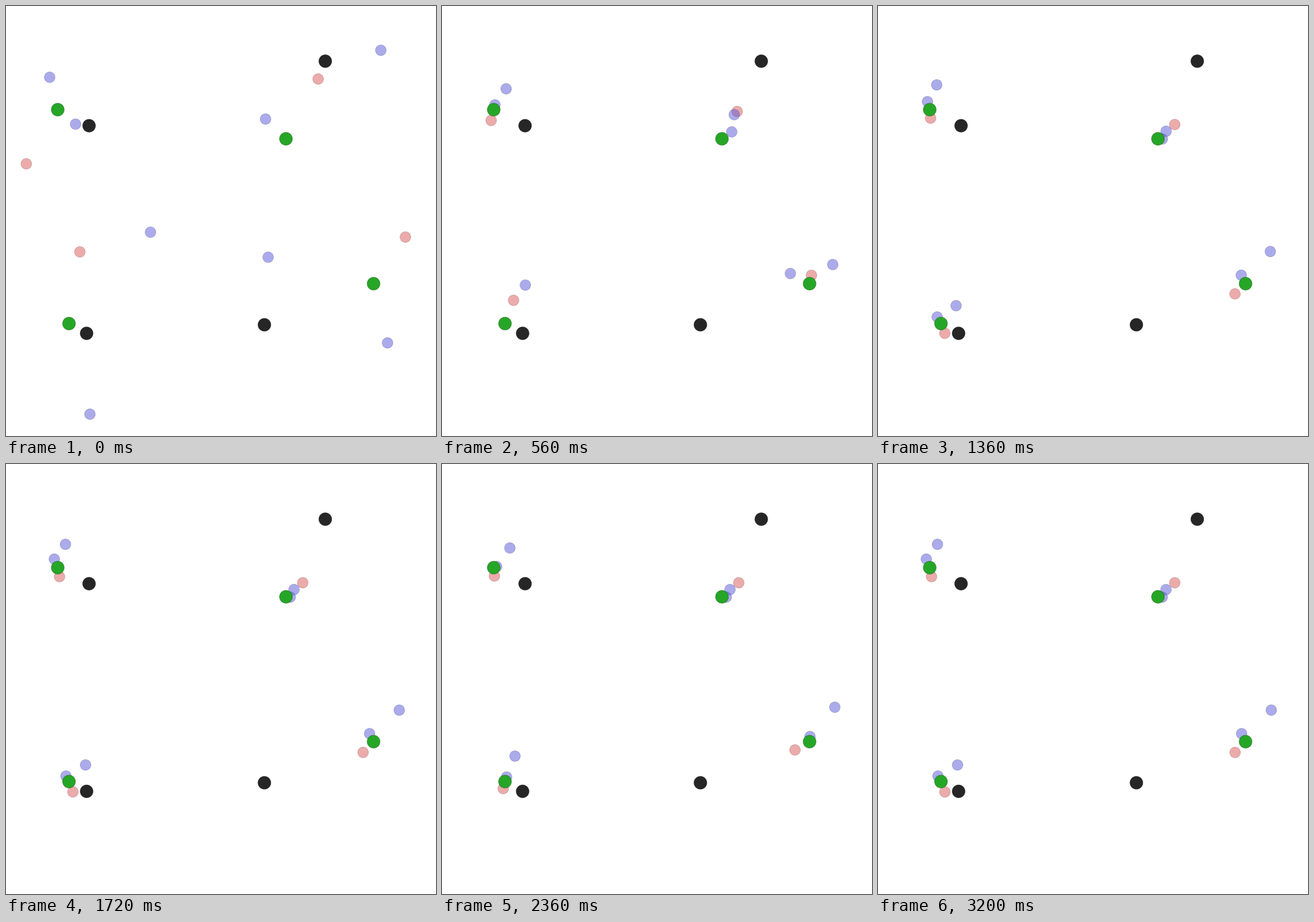
Animation, 748 px wide and 748 px high, one loop 3240 ms. Source, as a matplotlib script:

```python
import numpy as np
import matplotlib.pyplot as plt
from matplotlib.animation import FuncAnimation
from matplotlib.patches import Circle

SIZE, DPI = 748, 100
FRAMES, STEP_MS = 81, 40
PERIOD = 37 / 8        # frames per sway
ARRIVAL = 14           # end of the dash, start of the slow drift home
DASH, DRIFT = 0.6, 0.3

BLUE, RED = (0.35, 0.35, 0.85), (0.85, 0.35, 0.35)
GREEN, BLACK = (0.15, 0.65, 0.15), (0.15, 0.15, 0.15)


def approach(t, rate):
    """Critically damped step from 0 to 1."""
    return 1 - (1 + rate * t) * np.exp(-rate * t)


class Agent:
    """Dashes from start to near, drifts home and sways there diagonally."""
    color, slant, twist = BLUE, 0.95, 0.08
    layer = 2

    def __init__(self, start, home, near=None, sway=0, lag=0):
        self.start, self.home = np.array(start), np.array(home)
        self.near = self.home if near is None else np.array(near)
        self.sway = sway * np.array([1, self.slant])
        self.lag = lag + np.array([0, self.twist])
        self.patch = disc(start, 9.35, self.color, 0.5, self.layer)

    def at(self, frame):
        if frame <= ARRIVAL:
            done = approach(frame, DASH) / approach(ARRIVAL, DASH)
            return self.start + (self.near - self.start) * done
        t = frame - ARRIVAL
        swing = self.sway * np.cos(2 * np.pi * (frame - 34) / PERIOD
                                   - 2 * np.pi * self.lag)
        drift = (self.home - self.near) * approach(t, DRIFT)
        return self.near + drift + swing * min(t / 4, 1)


class Chaser(Agent):
    color, slant, twist = RED, 0.6, 0
    layer = 1


fig = plt.figure(figsize=(SIZE / DPI, SIZE / DPI), dpi=DPI, facecolor="white")
ax = fig.add_axes([0, 0, 1, 1])
ax.set(xlim=(0, SIZE), ylim=(SIZE, 0))
ax.axis("off")


def disc(center, radius, color, alpha, z):
    edge = tuple(c / 2 for c in color) + (alpha / 2,)
    return ax.add_patch(Circle(center, radius, facecolor=color + (alpha,),
                               edgecolor=edge, linewidth=72 / DPI, zorder=z))


agents = [
    # upper left
    Chaser((35.3, 274.5), (92.7, 195.7), near=(85.5, 199), sway=4.5, lag=0.71),
    Agent((76, 124), (111.6, 144), sway=9.8, lag=0.54),
    Agent((121, 205.5), (89, 171.8), near=(92, 172), sway=7, lag=0.32),
    # upper right
    Chaser((543, 127), (516.2, 206.6), near=(513.5, 183.5)),
    Agent((451.5, 196.7), (494.5, 231.5), near=(504, 219)),
    Agent((652, 77), (501, 218.4), near=(508.4, 189)),
    # lower left
    Chaser((128.5, 427.7), (111.4, 567.5), near=(124.5, 512),
           sway=5, lag=-0.06),
    Agent((251.3, 393.5), (133.5, 516.2), near=(145, 485.5),
          sway=8.7, lag=-0.21),
    Agent((146, 710), (109, 544.5), near=(110, 552), sway=6.8, lag=0.575),
    # lower right
    Chaser((694.8, 402), (617.7, 499.6), near=(642.7, 468.5),
           sway=3.7, lag=-0.11),
    Agent((456, 437), (636.5, 472), near=(606, 465.3), sway=4.1, lag=0.48),
    Agent((663.7, 586), (684.3, 426.1), near=(679.7, 449.8),
          sway=4.8, lag=0.69),
]

for place in (90, 180.3), (487, 231), (639.4, 483), (109.6, 552.4):
    disc(place, 11.2, GREEN, 1.0, 3)
for place in (144.5, 208.2), (555.4, 96), (140.2, 569.4), (449.5, 554.5):
    disc(place, 11.2, BLACK, 1.0, 3)


def draw(frame):
    for agent in agents:
        agent.patch.center = agent.at(frame)
    return [agent.patch for agent in agents]


anim = FuncAnimation(fig, draw, frames=FRAMES, interval=STEP_MS,
                     repeat=True, repeat_delay=0, blit=False)
plt.show()
```
